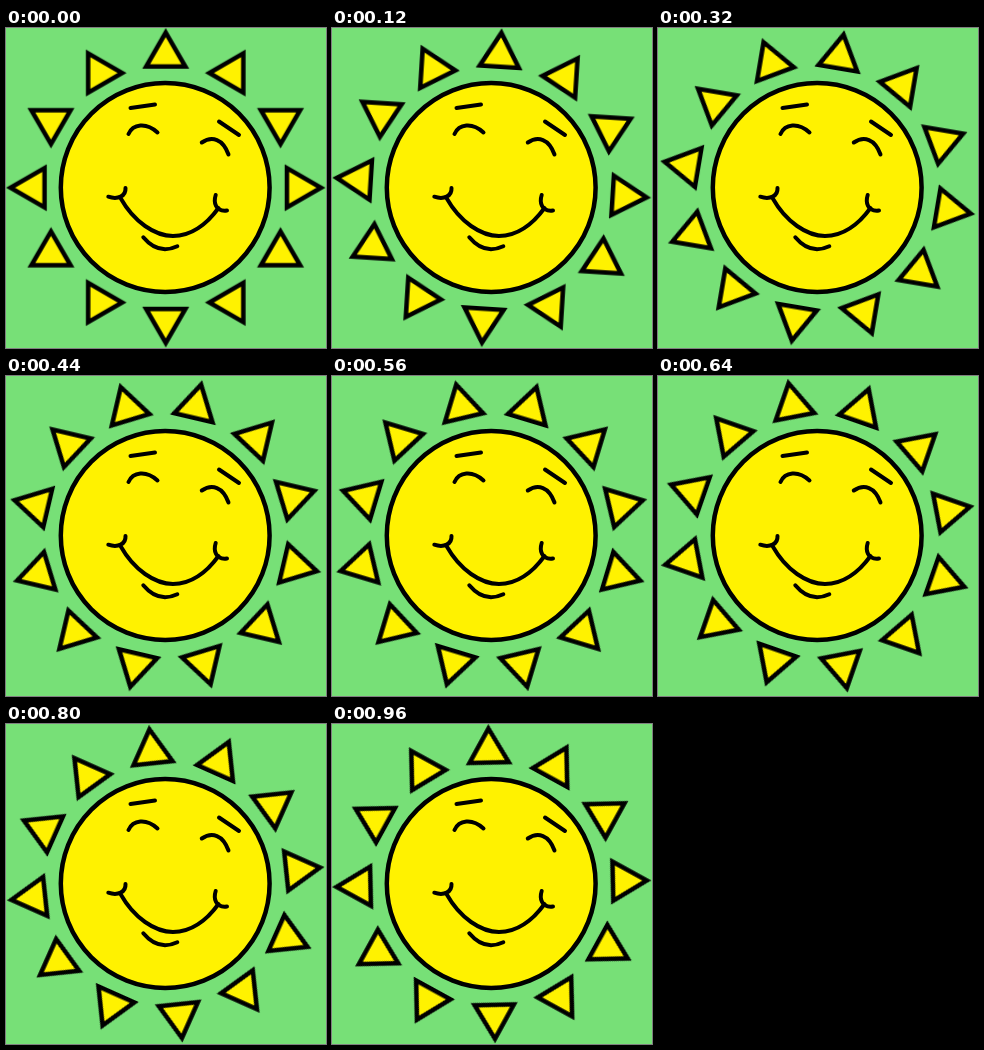
Write an HTML page that moves like this. It is 320 px wide and 320 px high and loops after 1 s.

```html
<!DOCTYPE html>
<html lang="en">
<head>
<meta charset="utf-8">
<title>Smiling sun</title>
<style>
  html, body { margin: 0; width: 100%; height: 100%; overflow: hidden; background: #77e077; }
  svg { display: block; width: 100%; height: 100%; }
  .sun { stroke: #000; stroke-width: 4.5; fill: #fff200; }
  .rays { animation: turn 1s steps(25) infinite; }
  .face { fill: none; stroke-width: 4; stroke-linecap: round; stroke-linejoin: round; }
  /* Twelve equal rays: a twelfth of a turn closes the loop */
  @keyframes turn { to { transform: rotate(30deg); } }
</style>
</head>
<body>
<svg viewBox="0 0 320 320">
  <defs>
    <path id="ray" d="M0-155.2 19.6-121.2H-19.6Z"/>
    <g id="trio">
      <use href="#ray"/>
      <use href="#ray" transform="rotate(30)"/>
      <use href="#ray" transform="rotate(60)"/>
    </g>
  </defs>
  <g class="sun">
    <g transform="translate(159.7 159.7)">
      <g class="rays">
        <use href="#trio"/>
        <use href="#trio" transform="rotate(90)"/>
        <use href="#trio" transform="rotate(180)"/>
        <use href="#trio" transform="rotate(270)"/>
      </g>
    </g>
    <circle cx="159.2" cy="159.5" r="104.4"/>
    <g class="face">
      <path d="M124.5 80 149 76.5"/>
      <path d="M213 93.500 233 107"/>
      <path d="M122.500 106C127 96 140 94 151.500 104.500"/>
      <path d="M195.800 114.500C206 107.500 217 111 222.500 126.500"/>
      <path d="M102.300 168.700C112 172 120 168 119.500 160"/>
      <path d="M209.700 167C207.500 174 209 184 221 182.500"/>
      <path d="M114.500 170C128 194 149 208 167 208C185 208 201 196 212.500 180"/>
      <path d="M137.300 209.300C147 221 158 224.500 171.300 218.300"/>
    </g>
  </g>
</svg>
</body>
</html>
```
